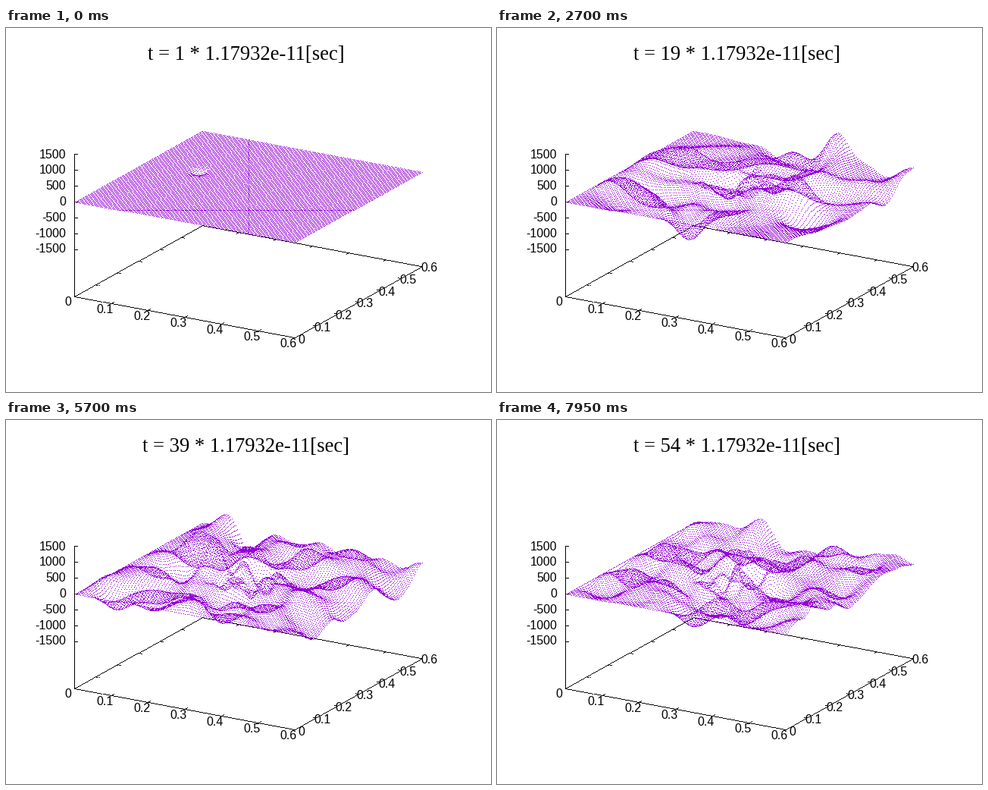
These frames come from a looping animation (640 px wide and 480 px high, 8000 ms). A matplotlib script:

```python
import numpy as np
import matplotlib.pyplot as plt
from matplotlib.animation import FuncAnimation

WIDTH, HEIGHT, DPI = 640, 480, 100
PX = 72 / DPI
CELLS, SIDE = 120, 0.6
FRAME_MS, HOLD, FRAMES = 50, 3, 160
SHOTS = (FRAMES - 1) // HOLD + 1
STEPS_PER_SHOT, FIRST_STEP = 10, 7
PULSE_STEPS = 48
RMS_HEIGHT = 250
DOT, INK = (148, 0, 211, 255), (0, 0, 0, 255)

# Screen vectors of the full x and y axes, and the anchor corner.
X_VEC = np.array([290.8, 54.1])
Y_VEC = np.array([168.2, -93.8])
BASE = np.array([90.4, 354.0])
ZERO_Y = 229.0
Z_SCALE = 125 / 3000


def simulate():
    """Pulse in a box: two fixed walls, two free walls, a dielectric disc."""
    axis = np.linspace(0, SIDE, CELLS + 1)
    x, y = np.meshgrid(axis, axis, indexing="ij")
    disc = np.hypot(x - 0.30, y - 0.30) < 0.10
    courant2 = np.where(disc, 0.125, 0.5)
    spot_size = 2.2 * SIDE / CELLS
    spot = np.exp(-((x - 0.14) ** 2 + (y - 0.34) ** 2) / (2 * spot_size ** 2))
    now, before = np.zeros_like(x), np.zeros_like(x)
    shots = []
    for step in range(1, FIRST_STEP + STEPS_PER_SHOT * (SHOTS - 1) + 1):
        pad = np.pad(now, 1, mode="reflect")
        laplace = (pad[2:, 1:-1] + pad[:-2, 1:-1] + pad[1:-1, 2:]
                   + pad[1:-1, :-2] - 4 * now)
        after = 2 * now - before + courant2 * laplace
        if step < PULSE_STEPS:
            phase = np.pi * step / PULSE_STEPS
            after -= spot * np.sin(2 * phase) * np.sin(phase) ** 2
        after[0, :] = after[:, 0] = 0
        before, now = now, after
        if step % STEPS_PER_SHOT == FIRST_STEP:
            shots.append(now)
    shots = np.array(shots)
    return shots * RMS_HEIGHT / np.sqrt(np.mean(shots[12:] ** 2))


def to_pixels(values, center):
    return center + np.trunc(values - center).astype(int)


def draw_line(picture, start, end):
    """One-pixel line without smoothing."""
    (x0, y0), (x1, y1) = start, end
    count = int(max(abs(x1 - x0), abs(y1 - y0))) + 1
    cols = np.rint(np.linspace(x0, x1, count)).astype(int)
    rows = np.rint(np.linspace(y0, y1, count)).astype(int)
    picture[rows, cols] = INK


def draw_axes():
    picture = np.zeros((HEIGHT, WIDTH, 4), np.uint8)
    right, back = BASE + X_VEC, BASE + Y_VEC
    far = right + Y_VEC
    for start, end in ((BASE, right), (right, far), (far, back), (back, BASE),
                       (BASE, (BASE[0], 166))):
        draw_line(picture, start, end)

    x_tick, y_tick = Y_VEC * 0.018, X_VEC * 0.014
    for part in np.linspace(0, 1, 7):
        on_x, on_y = part * X_VEC, part * Y_VEC
        for point, tick in ((BASE + on_x, x_tick), (back + on_x, -x_tick),
                            (BASE + on_y, y_tick), (right + on_y, -y_tick)):
            draw_line(picture, point, point + tick)
    for z in range(-1500, 1501, 500):
        y = ZERO_Y - Z_SCALE * z
        draw_line(picture, (BASE[0], y), (BASE[0] + 4, y))
    return picture


field = simulate()
ticks = np.linspace(0, 1, CELLS + 1)
U, V = np.meshgrid(ticks, ticks, indexing="ij")
flat_x = BASE[0] + U * X_VEC[0] + V * Y_VEC[0]
flat_y = ZERO_Y + U * X_VEC[1] + V * Y_VEC[1]
dot_cols = to_pixels(flat_x, WIDTH // 2)
axes_picture = draw_axes()


def surface(shot):
    rows = to_pixels(flat_y - Z_SCALE * field[shot], HEIGHT // 2)
    picture = axes_picture.copy()
    picture[np.clip(rows, 0, HEIGHT - 1), dot_cols] = DOT
    return picture


fig = plt.figure(figsize=(WIDTH / DPI, HEIGHT / DPI), dpi=DPI, facecolor="white")
ax = fig.add_axes([0, 0, 1, 1])
ax.set_axis_off()


def label(x, y, text, align="center"):
    ax.text(x, y + 5, text, family="Liberation Sans", size=16 * PX,
            ha=align, va="baseline", zorder=3)


for i in range(7):
    text = f"{i / 10:g}"
    label(82 + 48.5 * i, 361.5 + 9.1 * i, text)
    label(389.5 + 28.15 * i, 410.5 - 15.7 * i, text)
for z in range(-1500, 1501, 500):
    label(79, ZERO_Y - Z_SCALE * z, str(z), "right")

title = ax.text(317, 42, "", family="Liberation Serif", size=80 / 3 * PX,
                ha="center", va="baseline", zorder=3)
dots = ax.imshow(surface(0), extent=(0, WIDTH, HEIGHT, 0),
                 interpolation="nearest", aspect="auto", zorder=2)
ax.set_xlim(0, WIDTH)
ax.set_ylim(HEIGHT, 0)


def update(frame):
    shot = frame // HOLD
    title.set_text(f"t = {shot + 1} * 1.17932e-11[sec]")
    dots.set_data(surface(shot))
    return title, dots


animation = FuncAnimation(fig, update, frames=FRAMES, interval=FRAME_MS,
                          repeat=True, repeat_delay=0)
plt.show()
```
